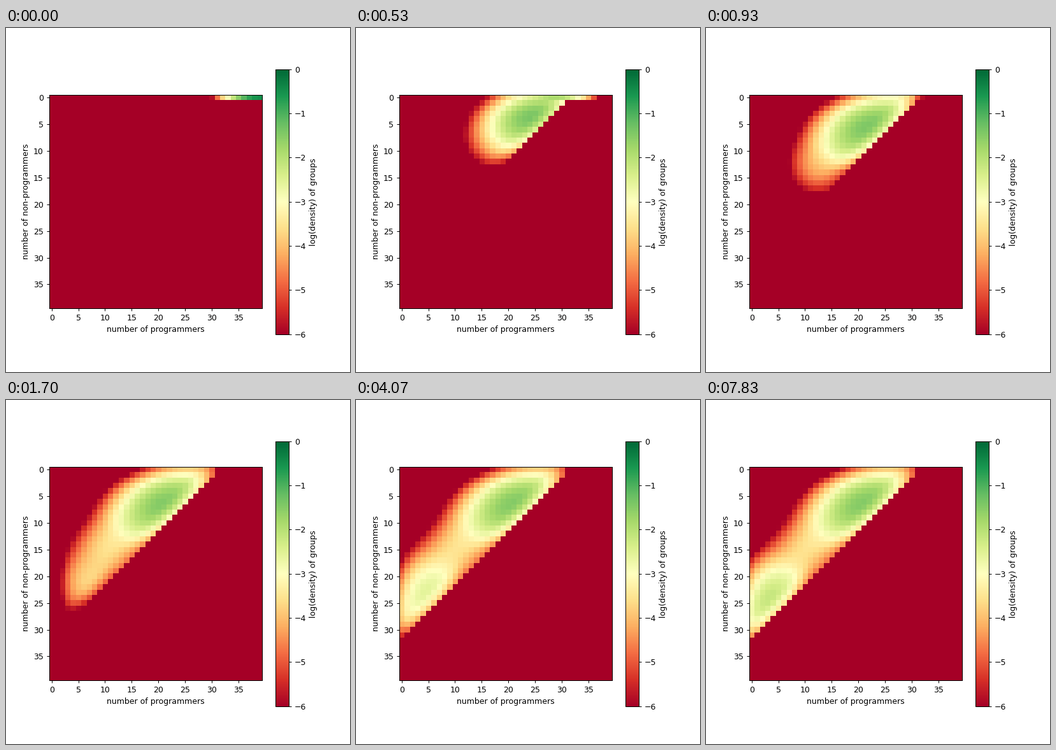
These frames come from a looping animation (540 px wide and 540 px high, 8 s). A matplotlib script:

```python
import numpy as np
import matplotlib.pyplot as plt
from matplotlib.animation import FuncAnimation

SIZE = 40
CAPACITY = 31
FRAMES, INTERVAL = 200, 40

x, y = np.meshgrid(np.arange(SIZE), np.arange(SIZE))
total, balance = x + y, x - y
allowed = total <= CAPACITY - (y == 0)

# Parameters settle over time; shorter lists hold their last value.
TIMES = np.array([0, 0.2, 0.53, 0.93, 1.7, 2.63, 5.7, 7.83])
KEYS = {
    # initial groups, made of programmers only
    "start_peak": [-0.5, -0.9, -2.0, -3.5, -9],
    "start_x": [39, 35.2, 29, 26, 24],
    # programmer-heavy groups
    "main_peak": [-6.5, -2.3, -1.25, -1.4, -1.48],
    "main_u": [30, 27, 21.5, 16.6, 14.7, 14.6],
    "main_s": [30.5, 29, 27.5, 27],
    "main_low": [0.1, 0.06, 0.027],
    "main_tail": [0.03, 0.025, 0.0125, 0.0105, 0.0095],
    "main_edge": [0.8, 0.8, 0.8, 1.0, 1.2],
    # the saddle between both kinds
    "mid_peak": [-9, -9, -7, -4.1, -3.55],
    "mid_u": [5, 5, 5, 0, -3],
    "mid_tail": [0.03, 0.03, 0.03, 0.03, 0.012, 0.005],
    # groups with few programmers
    "few_peak": [-9, -9, -8, -6.5, -3.6, -3.1, -2.3, -2.1],
    "few_u": [0, 0, 0, -6, -14, -16, -20, -21.5],
    "few_tail": [0.03, 0.03, 0.03, 0.03, 0.016, 0.006, 0.005],
    "few_edge": [4, 4, 4, 4, 4, 1.2, 0.65, 0.55],
}


def settle(t):
    return 1 - np.exp(-np.asarray(t) / 1.5)


def params(t):
    out = {}
    for name, values in KEYS.items():
        full = values + [values[-1]] * (len(TIMES) - len(values))
        out[name] = np.interp(settle(t), settle(TIMES), full)
    return out


def bump(peak, u0, s0, low, high, tail, head, mix=0.0):
    """Log density of a skewed bell along and across the diagonal."""
    du, ds = balance - u0, total - s0
    across = np.where(ds < 0, low, high) * ds**2
    along = np.where(du < 0, tail, head) * du**2
    return peak - across - along + mix * du * ds


def log_density(t):
    p = params(t)
    main = bump(p["main_peak"], p["main_u"], p["main_s"], p["main_low"],
                0.085, p["main_tail"], 0.0075, 0.008)
    main -= p["main_edge"] * np.exp(-(y / 2) ** 1.3)
    mid = bump(p["mid_peak"], p["mid_u"], 25, 0.03, 0.03, p["mid_tail"], 0.006)
    few = bump(p["few_peak"], p["few_u"], 27.3, 0.025, 0.09, p["few_tail"], 0.01)
    few -= p["few_edge"] * np.exp(-x / 1.5)
    density = np.where(allowed, 10.0**main + 10.0**mid + 10.0**few, 0)
    start = p["start_peak"] - 0.066 * (x - p["start_x"]) ** 2
    density += np.where(y == 0, 10.0**start, 0)
    return np.log10(density + 1e-12)


fig, ax = plt.subplots(figsize=(6, 6), dpi=90)
image = ax.imshow(log_density(0), cmap="RdYlGn", vmin=-6, vmax=0,
                  interpolation="nearest")
ax.set_xlabel("number of programmers")
ax.set_ylabel("number of non-programmers")
fig.colorbar(image, ax=ax, label="log(density) of groups")


def update(frame):
    image.set_data(log_density(frame * INTERVAL / 1000))
    return [image]


anim = FuncAnimation(fig, update, frames=FRAMES, interval=INTERVAL,
                     repeat=True, repeat_delay=0, blit=False)
plt.show()
```
